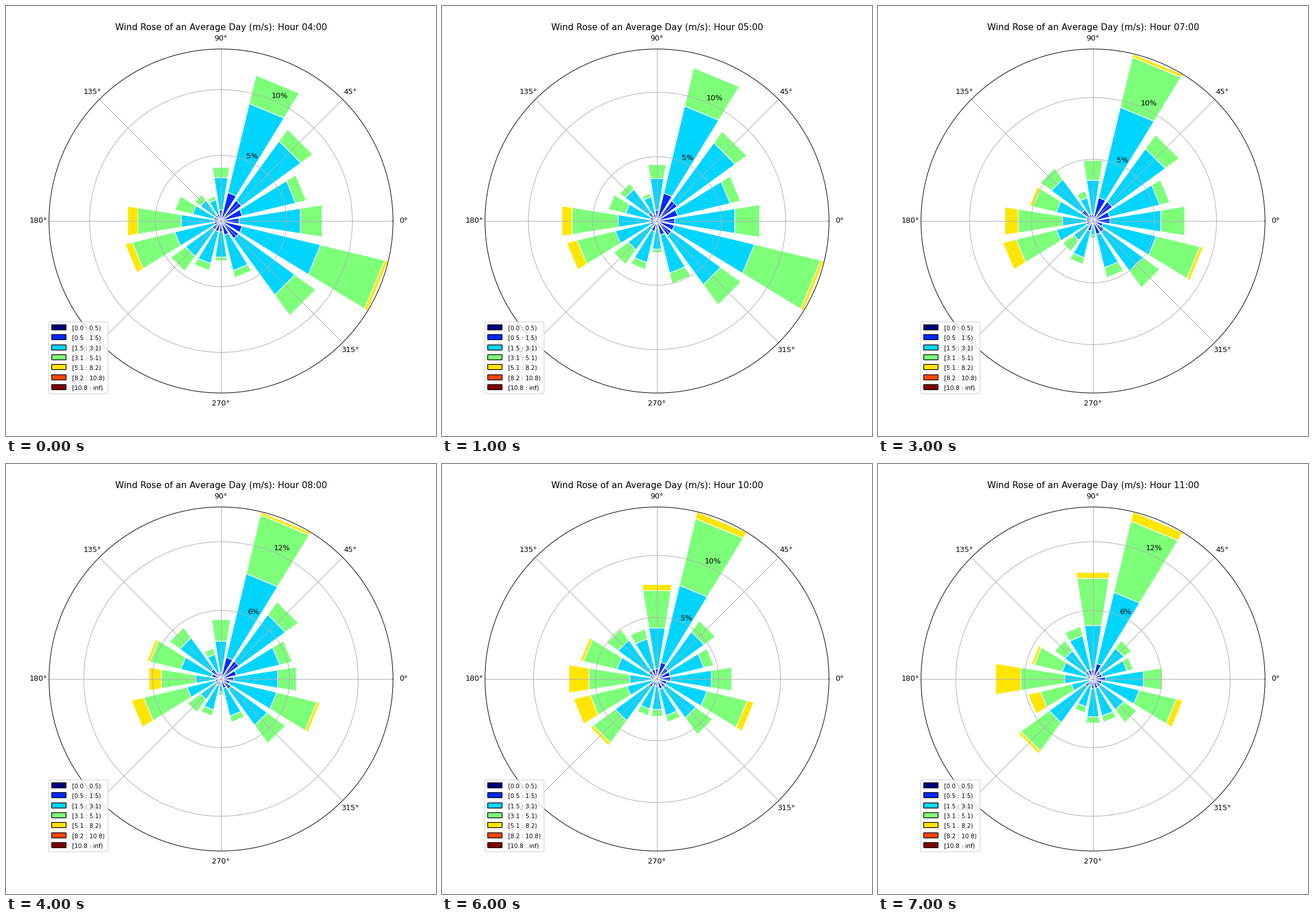
A matplotlib script that plays this animation: 748x748 px, repeating every 8000 ms.

```python
import numpy as np
import matplotlib.pyplot as plt
from matplotlib.animation import FuncAnimation
from matplotlib.patches import Rectangle

plt.rcParams["font.size"] = 9.9

FIRST_HOUR, HOURS = 4, 8
DAYS = 359
SECTORS = 16
STEP = 2 * np.pi / SECTORS
WIDTH = 0.8 * STEP
EDGES = [0.0, 0.5, 1.5, 3.1, 5.1, 8.2, 10.8]
TOPS = np.array(EDGES[1:] + [np.inf])
COLORS = plt.get_cmap("jet")(np.linspace(0, 1, len(EDGES)))
SHAPE = 2.75  # Weibull shape of the wind speeds

# Days of wind per sector, as evenly spaced key points over all hours.
DAY_KEYS = dict(
    E=[28, 30, 21, 22], ENE=[24, 23, 23, 13], NE=[31, 31, 30, 15],
    NNE=[41, 44, 47, 50, 54, 57, 50, 54],
    N=[15, 18, 19, 34], NNW=[7, 9, 17], NW=[9, 18, 21, 15],
    WNW=[13, 16, 27, 20], W=[26, 29, 20, 31], WSW=[27, 25, 31, 21],
    SW=[17, 10, 29], SSW=[14, 11], S=[11, 4, 14], SSE=[16, 20, 11, 14],
    SE=[32, 24, 25, 17], ESE=[47, 48, 38, 33, 32, 31, 29, 29])

# Windy directions: centre, spread (degrees), extra speed at start and end.
GUSTS = [(188, 35, 1.5, 2.2), (80, 20, 0.3, 1.4), (337, 22, 0.8, 1.0)]


def mix(a, b, t):
    return a + (b - a) * t


def speed(angle, t):
    """Weibull scale of the wind speed from one direction."""
    total = mix(2.4, 2.5, t)
    for centre, spread, start, end in GUSTS:
        off = (angle - centre + 180) % 360 - 180
        total += mix(start, end, t) * np.exp(-(off / spread) ** 2)
    return total


def rose(i):
    """Cumulative day counts, one row per sector."""
    t = i / (HOURS - 1)
    rows = []
    for s, keys in enumerate(DAY_KEYS.values()):
        days = round(np.interp(t, np.linspace(0, 1, len(keys)), keys))
        scale = speed(360 * s / SECTORS, t)
        rows.append(np.round(days * (1 - np.exp(-(TOPS / scale) ** SHAPE))))
    return np.array(rows)


fig = plt.figure(figsize=(8, 8), dpi=93.5, facecolor="white")
ax = fig.add_axes([0.1, 0.1, 0.8, 0.8], projection="polar")
ax.set_thetagrids(np.arange(0, 360, 45))

labels = [f"[{lo:.1f} : {hi:.1f})" for lo, hi in zip(EDGES, TOPS)]
keys = [Rectangle((0, 0), 0.2, 0.2, facecolor=c, edgecolor="black")
        for c in COLORS]
legend = ax.legend(keys, labels, loc="lower left", borderaxespad=-0.10)
for text in legend.get_texts():
    text.set_fontsize(7.9)

bars = []


def draw(i):
    while bars:
        bars.pop().remove()
    rows = rose(i)
    peak = rows.max()
    for s, row in enumerate(rows):
        base = 0
        for top, color in zip(row, COLORS):
            bar = Rectangle((s * STEP - WIDTH / 2, base), WIDTH, top - base,
                            facecolor=color, edgecolor="white")
            bars.append(ax.add_patch(bar))
            base = top

    step = 6 if peak / DAYS > 0.145 else 5
    rings = [step, 2 * step]
    ax.set_rgrids([p * DAYS / 100 for p in rings],
                  [f"{p}%" for p in rings], angle=67.5)
    ax.set_ylim(0, peak)
    ax.set_title("Wind Rose of an Average Day (m/s): "
                 f"Hour {FIRST_HOUR + i:02d}:00")
    return bars


anim = FuncAnimation(fig, draw, frames=HOURS, interval=1000,
                     init_func=lambda: draw(0), repeat=True, blit=False)
plt.show()
```
